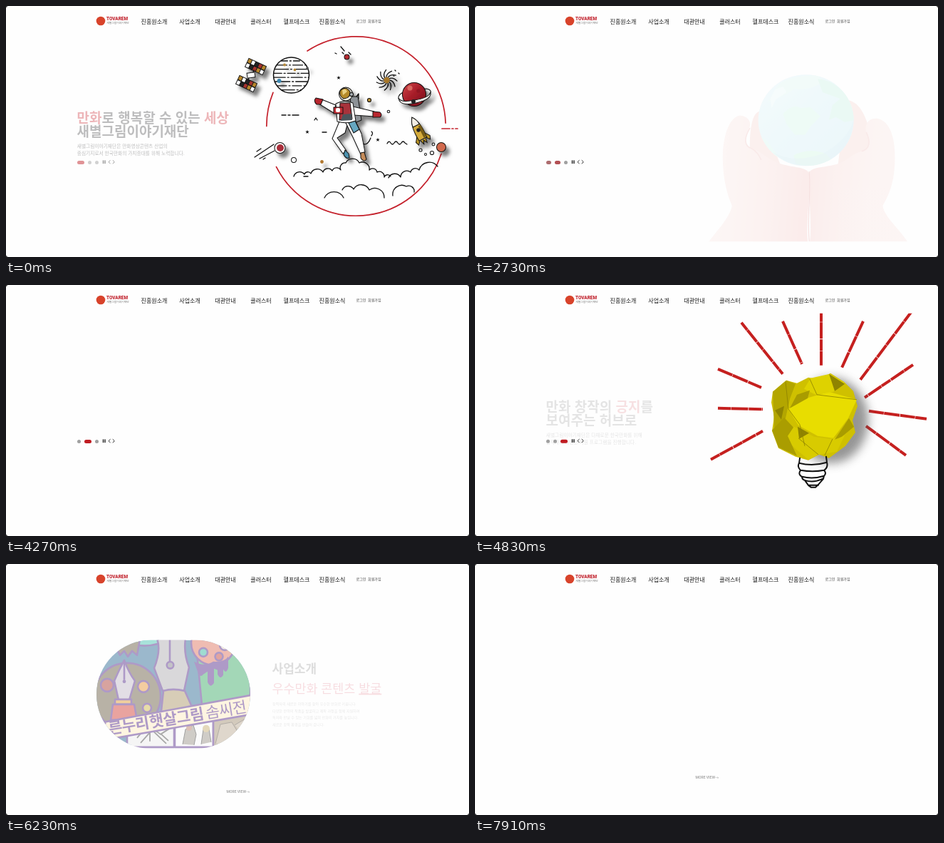
Recreate the animation shown at these times as an HTML page. Size 650x352 px, loop 8 s.

```html
<!DOCTYPE html>
<html lang="ko">
<head>
<meta charset="utf-8">
<title>Main page</title>
<style>
html, body { margin: 0; width: 100%; height: 100%; overflow: hidden; background: #fefefe; }
svg { display: block; width: 100vw; height: 100vh; }
text { font-family: "Noto Sans CJK KR", "Noto Sans CJK JP", "Noto Sans", sans-serif; white-space: pre; }
.ink { fill: none; stroke: #111; stroke-width: 1.3; stroke-linecap: round; stroke-linejoin: round; }
.red { fill: none; stroke: #c4202b; stroke-width: 1.7; stroke-linecap: round; }
</style>
</head>
<body>
<svg id="stage" viewBox="0 0 650 352" preserveAspectRatio="none"></svg>
<script>
const LOOP = 8000, RED = '#c8151f', DARK = '#2e2e30';
const stage = document.getElementById('stage');

// ---- drawing helpers ----
const text = (x, y, size, str, fill = DARK, weight = 700, extra = '') =>
  `<text x="${x}" y="${y}" font-size="${size}" fill="${fill}" font-weight="${weight}" ${extra}>${str}</text>`;
const mark = s => `<tspan fill="${RED}">${s}</tspan>`;
const dot = (x, y, r, fill = 'none', extra = '') =>
  `<circle cx="${x}" cy="${y}" r="${r}" fill="${fill}" ${extra}/>`;
const path = (d, fill = 'none', extra = '') => `<path d="${d}" fill="${fill}" ${extra}/>`;
const ink = (d, extra = '') => `<path class="ink" d="${d}" ${extra}/>`;
const rect = (x, y, w, h, fill, extra = '') =>
  `<rect x="${x}" y="${y}" width="${w}" height="${h}" fill="${fill}" ${extra}/>`;
const range = (n, f) => Array.from({ length: n }, (_, i) => f(i)).join('');

function arc(cx, cy, r, from, to) {
  const p = a => `${cx + r * Math.cos(a * Math.PI / 180)} ${cy + r * Math.sin(a * Math.PI / 180)}`;
  return `M${p(from)}A${r} ${r} 0 ${to - from > 180 ? 1 : 0} 1 ${p(to)}`;
}
function cloud(pts) {
  let d = `M${pts[0]}`;
  for (let i = 1; i < pts.length; i++) {
    const r = .56 * Math.hypot(pts[i][0] - pts[i - 1][0], pts[i][1] - pts[i - 1][1]);
    d += `A${r} ${r} 0 0 1 ${pts[i]}`;
  }
  return ink(d, 'stroke-width="1.5"');
}
const star = (x, y) => text(x - 3, y + 2.5, 6, '★', '#111', 400);

// ---- slide 1: space ----
function panel(x, y) {
  const hues = ['#b8872c', '#fff', '#3d87a5', '#222', '#a8322f', '#ddd'];
  return `<g transform="translate(${x} ${y}) rotate(25)">${rect(-14, -7, 28, 14, '#181818')}` +
    range(10, i => rect(-13 + i % 5 * 5.4, i < 5 ? -6 : .7, 4.4, 5.3, hues[(i * 7 + (i >> 1)) % 6])) + '</g>';
}
function swirl(x, y) {
  return range(11, i => {
    const at = (r, turn) => {
      const a = i * Math.PI * 2 / 11 + turn;
      return `${x + r * Math.cos(a)} ${y + r * Math.sin(a)}`;
    };
    return ink(`M${at(4, 0)}Q${at(10, .1)} ${at(14.5, .65)}`);
  }) + dot(x, y, 4.2, '#a8782c');
}
function astronaut() {
  const s = 'stroke="#111" stroke-width="1" stroke-linejoin="round"';
  return path('M483 127L494 127L499 160L487 165Z', '#8d9297', s) + ink('M492 127L495 123L495 130') +
    path('M463 139L443 131L439 137L460 150Z', '#fff', s) +
    path('M445 131L435 129Q431 133 436 138L442 138Z', '#b8252d', s) +
    path('M487 141L517 148L517 155L488 153Z', '#fff', s) +
    path('M515 148L525 149Q529 153 525 156L515 156Z', '#b8252d', s) +
    path('M468 162L480 163L476 178L465 185L478 203L473 207L458 186Z', '#fff', s) +
    path('M476 202L481 207L482 213Q477 215 474 208Z', '#4b91ae', s) +
    path('M476 162L490 160L499 179L504 205L498 208L487 184Z', '#fff', s) +
    path('M481 164L490 161L496 173L488 178Z', '#66a7c1', s) +
    path('M498 206L503 205L506 215Q502 220 498 213Z', '#c58c5a', s) +
    path('M463 137Q474 131 487 136L491 161Q478 166 465 162Z', '#fff', s) +
    path('M469 136L483 136L486 158L468 160Z', '#a8323b', s) +
    rect(460, 142, 13, 9, '#c22d35', s) + rect(463, 143, 6, 6, '#fff', 'rx="2"') +
    path('M473 152L485 151L486 160L470 161Z', '#4b545c') +
    dot(477, 123.5, 9.5, '#f3efe5', s) +
    path('M469 119Q477 111 483 120Q484 129 474 130Q467 126 469 119Z', '#b58a2c', s) +
    path('M472 118Q477 115 479 120L473 125Z', '#ead184') + dot(485, 124, 2.6, '#a9afb2', s);
}
function space() {
  const ring = 'stroke="#111" stroke-width="1"';
  return `<g filter="url(#shade)">${panel(350.5, 85)}${panel(337.5, 109)}` +
    `${rect(338.5, 93.5, 11, 7, '#fff', 'stroke="#111" transform="rotate(-8 344 97)"')}</g>` +
    ink('M347 93L348 90M341 101L340 104') +
    [[237, 358], [180, 202], [18, 153]].map(a => `<path class="red" d="${arc(491.5, 168.5, 125.7, ...a)}"/>`).join('') +
    path('M612 172H623M626 172H628M631 172H634', 'none', 'class="red"') +
    dot(400.5, 97, 25, '#fff', 'stroke="#111" stroke-width="1.5"') +
    range(8, i => {
      const y = 77 + i * 5.8, w = Math.sqrt(600 - (y - 97) ** 2);
      return ink(`M${400.5 - w} ${y}H${400.5 + w}`, `stroke-width="1" stroke-dasharray="${9 + i * 5 % 13} 3 2 3"`);
    }) +
    `<g filter="url(#shade)">${dot(391, 82.5, 2, '#b58a3c')}${dot(405.5, 89.5, 1.9, '#b58a3c')}` +
    `${dot(383.5, 105, 3, '#3b87b0')}${dot(423, 87, 1.8, '#555')}</g>` +
    ink('M470 57L475 63M474 67L472 65M481 65L484 68M462 66L464 67') +
    ink('M387 153H393M396 153H399M402 153H411M433 160L435 157L437 160M444 177H450M418 239H424') +
    ink('M535 193Q537.500 188 540 192T545 192T550 192T555 192T560 192L563 194') +
    ink('M497 191Q507 199 512 185M513 182Q516 178 513 176M546 90L547 91M551 94L552 95M544 98L545 98') +
    star(467, 100) + star(423, 176) + star(522, 187) +
    [[404, 216, 3.5], [537, 148, 1.8], [582, 202, 2.1], [598, 206, 2.6], [600, 194, 1.9], [589, 208, 1.5]]
      .map(c => dot(...c, 'none', ring)).join('') +
    cloud([[404, 239], [419, 236], [428, 235], [445, 233], [458, 231], [470, 230], [477, 220], [496, 220], [510, 230], [521, 233], [531, 240], [540, 239]]) +
    cloud([[537, 241], [554, 240], [568, 233], [580, 230], [606, 225]]) +
    cloud([[447, 269], [474, 269]]) + cloud([[472, 258], [488, 257], [510, 258], [531, 269]]) +
    cloud([[543, 266], [562, 253], [573, 261]]) +
    ink('M349 212L376 194M352 204L358 200M356 214L377 203M361 215L364 213') +
    `<g filter="url(#shade)">${dot(478.5, 71.5, 3.5, '#b52a30', ring)}${swirl(534.5, 104)}` +
    path('M551 130Q550 123 561 120L590 116Q600 118 594 124', 'none', ring) +
    dot(573, 124, 16.5, 'url(#mars)', ring) +
    dot(567, 115, 3.6, '#d96760') + dot(579, 119, 2.6, '#8f1621') + dot(580, 133, 3, '#d85a58') +
    path('M551 129Q554 136 573 132Q594 129 596 121Q598 128 586 133Q553 144 551 129Z', '#f3efed', ring) +
    dot(572, 134, 3, '#222') +
    `<g transform="translate(579 174) rotate(-27)">` +
    path('M-5 6L-11 14L-9 19L-4 13ZM5 6L11 14L9 19L4 13Z', '#b89325', ring) +
    path('M0 -20Q8 -10 6 14L-6 14Q-8 -10 0 -20Z', '#d4ab3a', ring) +
    path('M0 -20Q5 -13 5 -7H-5Q-5 -13 0 -20Z', '#f3eee4', ring) + path('M2 -5H6V13H2Z', '#765b17') +
    dot(0, 0, 2.7, '#222') + path('M-4 15L-2 21L0 16L3 21L4 15', '#b89325', ring) + '</g>' +
    dot(611, 198, 6.5, '#d1694d', ring) + dot(384.500, 199, 7.5, '#fff', ring) + dot(385, 199, 5, '#a92f3b') +
    dot(443.5, 218.5, 2.4, '#b1772d') + dot(510, 132, 2.6, '#b89138', ring) + astronaut() + '</g>' +
    path('M463 160C455 170 455 186 466 192', 'none', 'class="red rope" pathLength="100" stroke-dasharray="100"') +
    path('M391 184C372 190 349 194 342 187C336 178 358 176 352 168C346 164 339 169 341 157C345 145 343 139 331 139C325 139 321 143 315 144',
      'none', 'class="red rope" pathLength="100" stroke-dasharray="100"');
}

// ---- slide 2: hands and globe ----
function hands() {
  return path('M522 132C538 132 552 150 558 190L553 230L510 230Z', '#f0b9b2') +
    path('M400 148C390 150 386 170 386 200L395 235L430 225Z', '#f0b9b2') +
    path('M328 332C341 315 358 297 361 281C351 259 347 232 348 205C350 178 358 157 371 154C382 153 390 163 385 172C377 187 379 197 388 200C400 203 410 214 422 219C442 228 468 225 470 236C472 270 465 305 468 332Z', 'url(#skinL)') +
    path('M609 332C598 314 576 297 574 281C588 258 592 235 591 205C590 177 580 160 566 158C554 157 547 167 551 178C559 195 552 202 545 204C532 207 525 216 514 221C496 228 471 225 470 236C469 270 474 305 471 332Z', 'url(#skinR)') +
    ink('M470 233C473 262 467 292 470 331', 'style="stroke:#d7706f;stroke-width:1.2"') +
    ink('M386 172C377 187 379 197 388 200C396 204 399 210 402 216M551 178C559 195 552 202 545 204', 'style="stroke:#e59c96;stroke-width:1.6"') +
    `<g clip-path="url(#ball)">${rect(395, 93, 142, 135, 'url(#sea)')}` +
    path('M425 112Q440 97 482 97L490 106Q468 120 450 116Q432 128 412 134Z', '#c4f1e5') +
    path('M482 102Q510 104 528 134L536 160L520 163L508 156L498 160L503 139L514 130L489 121Z', '#9fe6cb') +
    path('M433 151Q448 136 457 143L472 142L486 155L473 168L464 181L450 181L438 166Z', '#b2efd7') +
    path('M448 210Q470 198 494 208L502 217Q476 229 451 222Z', '#a9edca') +
    path('M399 181L411 190L426 211L415 211Z', '#b4eee1') +
    path('M415 130L422 117L433 113L438 121L423 131L417 143Z', '#d5f5f5') +
    path('M500 218Q530 200 534 155Q527 188 488 208Q446 222 418 205Q452 236 500 218Z', '#8fc8dc', 'opacity=".45"') + '</g>';
}

// ---- slide 3: paper bulb ----
function bulb() {
  const rays = [[374, 53, 432, 125], [432, 51, 459, 111], [486, 36, 486, 113], [545, 51, 515, 116],
    [614, 36, 541, 133], [615, 112, 547, 158], [341, 118, 402, 144], [341, 173, 404, 174.5],
    [331, 245, 404, 205], [553, 177, 634, 188], [549, 198, 605, 239]];
  return rays.map(([a, b, c, d], i) =>
    path(`M${a} ${b}L${c} ${d}`, 'none', `stroke="#c5201f" stroke-width="4" stroke-dasharray="${13 + i * 7 % 11} .5 ${21 + i % 4} .8"`)).join('') +
    `<ellipse cx="500" cy="190" rx="52" ry="60" fill="#555" opacity=".62" filter="url(#soft)"/>` +
    path('M418 150L437 134L452 138L468 130L484 133L499 124L518 136L531 149L537 170L530 190L534 207L520 226L497 243L483 238L468 246L450 241L426 229L417 205L420 185L416 165Z', '#cfc000') +
    path('M440 174L469 158L497 150L536 161L524 187L503 215L481 212L454 197Z', '#e8dd00') +
    path('M471 131L498 125L519 137L503 150L478 154L462 146Z', '#ded200') +
    path('M418 150L437 134L450 139L442 160L436 187L420 202Z', '#b3a600') +
    path('M426 205L448 199L476 213L498 216L519 211L508 234L483 238L468 245L450 230Z', '#d8cb00') +
    path('M417 204L434 186L447 200L439 212L452 240L426 228Z', '#aa9d00') +
    path('M442 173L452 154L470 148L467 159ZM525 187L532 199L515 213L505 217Z', '#a99c00') +
    path('M453 199L469 208L455 216ZM497 125L505 149L519 139ZM421 176L434 170L430 189Z', '#8f8400') +
    path('M436 136L440 174L456 196L463 226M470 132L480 154L536 161M502 216L491 239M454 215L482 238', 'none', 'stroke="#8c8100" stroke-width=".8"') +
    ink('M456 243L455 250M493 241L494 249M455 250Q474 255 494 249Q496 256 490 260Q474 263 457 260Q452 255 455 250M457 260Q453 266 459 269Q474 273 490 268Q494 264 490 260M459 269Q459 273 463 274L468 281L472 284H478L482 280L489 272L490 268M463 274Q475 278 488 272M468 281H482', 'style="stroke-width:2"');
}

// ---- second section picture ----
function poster() {
  const p = '#613991', s = `stroke="${p}" stroke-width="2.6" stroke-linejoin="round"`;
  return `<g transform="translate(0 -28)">${rect(127, 107, 216, 152, '#e3e3e4', 'rx="76"')}<g clip-path="url(#pill)">` +
    rect(127, 107, 216, 147, '#3a749c') +
    path('M160 105Q186 120 214 112V100H160Z', '#54c8b7', s) +
    path('M154 116L160 128L166 122L171 130L177 122L184 128L188 106L160 104Z', '#756951', s) +
    path('M268 125L343 100V190L275 198Z', '#4bb173', s) +
    dot(170, 186, 47, '#756951', s) + dot(142, 170, 9, '#b24a43', s) +
    dot(193, 172, 8, '#e99c45', s) + dot(198, 202, 6, '#d2bb55', s) +
    path('M166 135Q158 150 152 164L158 191H173L181 164Q172 152 166 135Z', '#c7c0cd', s) +
    path('M166 137V163', 'none', s) + dot(166, 165, 2.4, p) +
    rect(153, 190, 23, 7, '#e3a13f', s) + path('M150 197H180L184 219H147Z', '#d64b43', s) +
    path('M212 105Q218 121 208 146L220 178H250L257 145Q249 125 252 105Z', '#b5b4b7', s) +
    path('M230 106V137', 'none', s) + dot(230.5, 142, 4.8, '#8a8990', s) +
    path('M221 178Q234 174 251 178L264 207L217 215Z', '#b19e72', s) +
    dot(291, 111, 31, '#e17d69', s) + dot(307, 114, 7, '#eee3d4', s) + dot(277, 124, 6, '#42bba5', s) + dot(299, 130, 5.5, '#c54c45', s) +
    path('M264 137Q278 145 291 137Q307 138 312 130V146Q309 155 305 148V156Q301 163 297 155V149L292 147V167Q287 175 283 166V151L277 155Q272 161 269 151Z', p) +
    rect(170, 217, 66, 40, '#eee', s) + rect(237, 213, 54, 44, '#fafafa', s) + rect(291, 205, 55, 52, '#aa987d', s) +
    path('M184 244Q199 224 217 239L231 230M189 251L205 233L225 252M193 232H212M202 236V249M217 238L228 248', 'none', 'stroke="#555" stroke-width="1.8"') +
    path('M248 253L252 232L263 226L267 239L264 254M274 253L277 232L285 231L288 250', '#a29c91', 'stroke="#444"') +
    dot(257, 230, 4, '#bd836f') + dot(281, 231, 5, '#ccb37b') +
    path('M294 252L301 225L317 222L325 235L322 253M321 226L338 216L342 249', '#c2b29b', 'stroke="#665c50"') +
    path('M120 225L350 183V210L120 250Z', '#ffedc5', s) +
    `<g transform="translate(126 242) rotate(-9.2)">${text(0, 0, 21.5,
      '푸른누리<tspan dx="1">햇살그림</tspan><tspan dx="3" font-weight="400">솜씨전</tspan>', p, 900, 'letter-spacing="-.6"')}</g>` +
    '</g></g>';
}

// ---- page ----
const ORG = '새별그림이야기재단';
const copy = [
  [`${mark('만화')}로 행복할 수 있는 ${mark('세상')}`, ORG,
    `${ORG}은 만화영상콘텐츠 산업의`, '중심기지로서 한국만화의 가치증대를 위해 노력합니다.'],
  [mark('문화강국,'), '한국만화가 선도하겠습니다.',
    `${ORG}은 글로벌 콘텐츠 시장에서의`, '한국 만화의 가치를 실현합니다.'],
  [`만화 창작의 ${mark('긍지')}를`, '보여주는 허브로',
    `${ORG}은 다채로운 한국만화를 위해`, '창작자의 다양한 지원 프로그램을 진행합니다.']
];
const details = ['창작자의 새로운 이야기를 찾아 우수한 만화로 키웁니다.', '다양한 분야의 작품을 발굴하고 제작 과정을 함께 지원하며',
  '독자와 만날 수 있는 기회를 넓혀 만화의 가치를 높입니다.', '새로운 창작 환경을 만들어 갑니다.'];
const menu = ['진흥원소개', '사업소개', '대관안내', '클러스터', '헬프데스크', '진흥원소식'];

const grad = (id, stops, at) => `<linearGradient id="${id}" ${at}>` +
  stops.map((c, i) => `<stop offset="${i / (stops.length - 1)}" stop-color="${c}"/>`).join('') + '</linearGradient>';
const defs = '<defs>' +
  '<filter id="shade" x="-20%" y="-20%" width="150%" height="150%"><feDropShadow dx="5" dy="6" stdDeviation="2.5" flood-opacity=".5"/></filter>' +
  '<filter id="soft" x="-30%" y="-30%" width="160%" height="160%"><feGaussianBlur stdDeviation="7"/></filter>' +
  '<clipPath id="frame"><rect x="310" y="40" width="340" height="292"/></clipPath>' +
  '<clipPath id="ball"><ellipse cx="465.5" cy="160.5" rx="67.5" ry="64.5"/></clipPath>' +
  '<clipPath id="pill"><rect x="127" y="107" width="216" height="152" rx="76"/></clipPath>' +
  grad('mars', ['#cf4548', '#a51b28', '#74131d'], 'x2="1" y2="1"') +
  grad('sea', ['#cdeff4', '#b2e4ef', '#a4dbe9'], 'x2="1" y2="1"') +
  grad('skinL', ['#f8dcd8', '#f5d0ca', '#f2c0ba', '#eda7a2'], 'x2="1" y2=".1"') +
  grad('skinR', ['#eda7a2', '#f2c0ba', '#f5d0ca', '#f6d2cd'], 'x2="1" y2=".1"') + '</defs>';

const header = dot(133, 21, 6.3, '#d8432b') +
  text(141, 20.4, 6.4, 'TOVAREM', '#c22631', 900, 'style="font-family:Roboto,sans-serif"') +
  text(141.3, 25, 3.8, ORG, '#777', 500) +
  menu.map((m, i) => text(208 + i * 50, 24.9, 8, m, '#151515', 500, 'text-anchor="middle"')).join('') +
  text(491.5, 23, 5.1, '로그인', '#444', 400) + text(508, 23, 5.1, '회원가입', '#444', 400);

const slides = [space, hands, bulb].map((draw, i) => {
  const [a, b, c, d] = copy[i];
  return `<g class="art" clip-path="url(#frame)">${draw()}</g><g class="copy">` +
    text(99.5, 154.2, 19, a) + text(99.5, 173.4, 19, b) +
    text(99.8, 189.6, 6.7, c, DARK, 500) + text(99.8, 199.6, 6.7, d, DARK, 500) + '</g>';
}).join('');

const controls = range(3, () => '<rect class="page" y="217" height="5" rx="2.5"/>') +
  rect(135.8, 216.4, 1.4, 4.7, '#222') + rect(138.3, 216.4, 1.4, 4.7, '#222') +
  ink('M146.300 216.500L144 218.700L146.300 221M150 216.500L152.300 218.700L150 221', 'style="stroke:#333;stroke-width:1"');

const section = `<g id="body"><g id="picture">${poster()}</g><g id="intro">` +
  text(373.5, 124, 17, '사업소개', '#222') +
  text(373.5, 151.4, 17.4, '우수만화 콘텐츠 <tspan text-decoration="underline">발굴</tspan>', '#d4213b', 300) +
  details.map((s, i) => text(374, 169 + i * 9.6, 5.1, s, '#666', 400)).join('') + '</g></g>' +
  text(309.500, 300.8, 5.1, 'MORE VIEW→', '#9b9b9b', 500, 'style="font-family:Roboto,\'Noto Sans CJK KR\',sans-serif"');

stage.innerHTML = defs + `<g id="hero">${slides}<g id="controls">${controls}</g></g><g id="section">${section}</g>` +
  header + path('M0 0H2.500L0 2.500ZM650 0V2.500L647.500 0ZM0 352V349.500L2.500 352ZM650 352H647.500L650 349.500Z', '#444');

// ---- motion ----
const get = id => document.getElementById(id);
const all = sel => [...document.querySelectorAll(sel)];
const arts = all('.art'), copies = all('.copy'), pages = all('.page'), ropes = all('.rope');
const hero = get('hero'), sect = get('section'), body = get('body'), picture = get('picture'), intro = get('intro');
const starts = [-880, 2550, 4320, Infinity], zoomFrom = [0, 3430, 4830];

const ramp = (t, from, span) => Math.min(1, Math.max(0, (t - from) / span));
const easeOut = x => 1 - (1 - x) ** 3;
const mix = (a, b, x) => Math.round(a + (b - a) * x);
const set = (el, attrs) => { for (const k in attrs) el.setAttribute(k, attrs[k]); };

function render(t) {
  const ui = .47 + .53 * ramp(t, 0, 480);
  let x = 100;
  for (let i = 0; i < 3; i++) {
    const on = starts[i], off = starts[i + 1];
    const leave = 1 - ramp(t, off - 270, 220);
    const rise = ramp(t, on + 425, 700);
    const zoom = 1 + 1e-5 * (t - zoomFrom[i]);
    const shown = ramp(t, on + 100, 400) * leave;
    set(arts[i], {
      opacity: shown, visibility: shown ? 'visible' : 'hidden',
      transform: `translate(344 130) scale(${zoom}) translate(-344 -130)`
    });
    set(copies[i], { opacity: rise * leave * ui, transform: `translate(0 ${27 * (1 - rise)})` });

    const active = ramp(t, on, 300) * (1 - ramp(t, off, 300));
    const w = 5 + 5 * active;
    set(pages[i], { x, width: w, fill: `rgb(${mix(160, 192, active)},${mix(160, 28, active)},${mix(160, 34, active)})` });
    x += w + 5;
  }
  set(get('controls'), { opacity: ui });
  ropes.forEach(r => set(r, {
    'stroke-dashoffset': 100 * (1 - ramp(t, 650, 520)), visibility: t > 650 ? 'visible' : 'hidden'
  }));

  // smooth page scroll that settles exponentially
  const left = 352 * (1 + Math.exp((t - 5323) / 316 * 4)) ** -.25;
  set(hero, { transform: `translate(0 ${left - 352})` });
  set(sect, { transform: `translate(0 ${left})` });

  const pic = easeOut(ramp(t, 5990, 1165)), words = easeOut(ramp(t, 6170, 1200));
  set(picture, { opacity: pic, transform: `translate(0 ${16 * (1 - pic)})` });
  set(intro, { opacity: words, transform: `translate(0 ${11 * (1 - words)})` });
  set(body, { visibility: t < 7910 ? 'visible' : 'hidden' });
}

const begin = performance.now();
function tick() {
  render((performance.now() - begin) % LOOP);
  requestAnimationFrame(tick);
}
tick();
</script>
</body>
</html>
```
